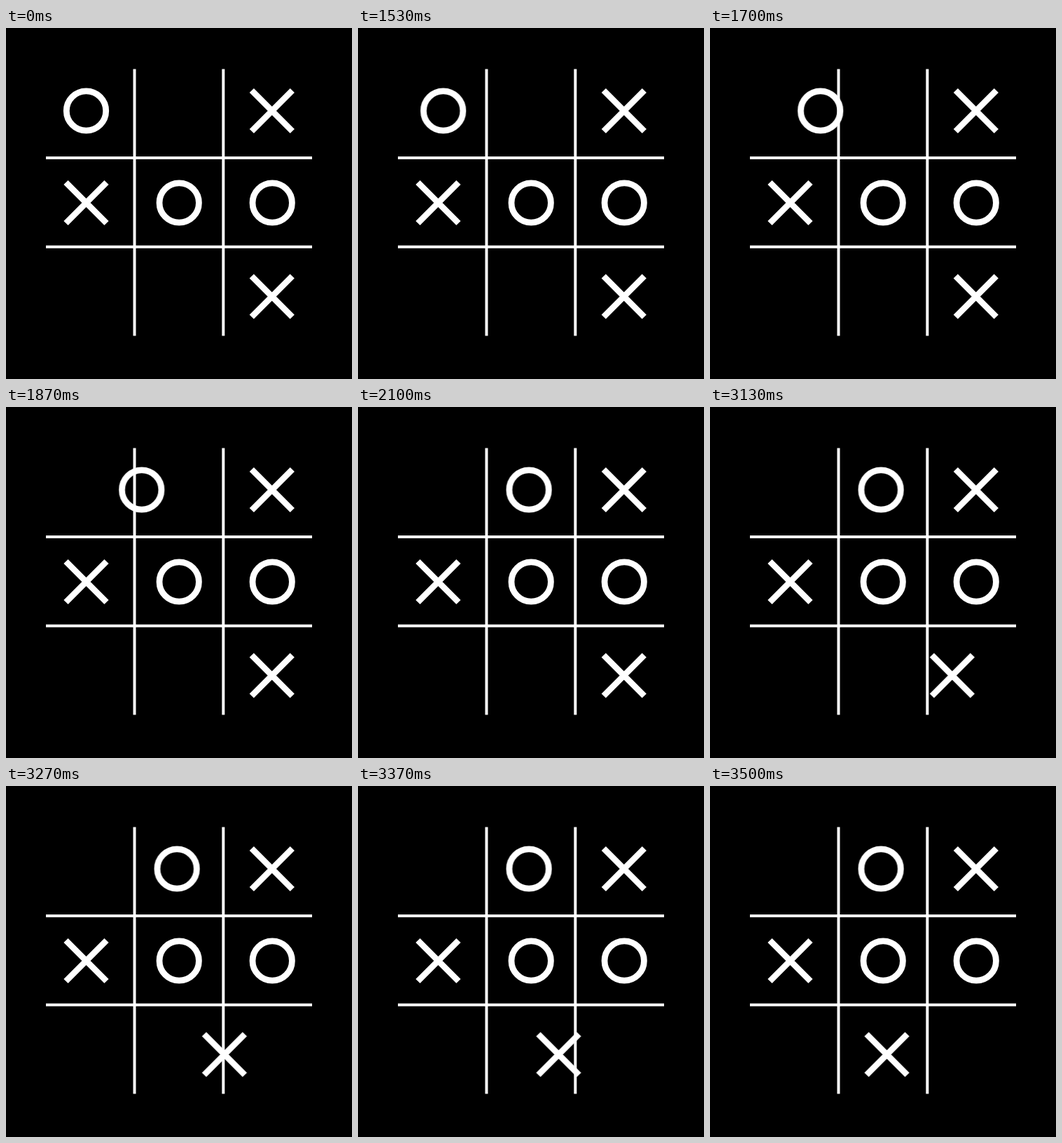
Animation of 494 by 500 pixels, one loop 4510 ms. Source, as an HTML page without scripts:

```html
<!DOCTYPE html>
<html lang="en">
<head>
<meta charset="utf-8">
<title>Noughts and crosses</title>
<style>
  html, body {
    margin: 0;
    width: 100%;
    height: 100%;
    overflow: hidden;
    background: #000;
  }
  svg { display: block; width: 100%; height: 100%; }
  .board, .mark { fill: none; stroke: #fff; }
  .board { stroke-width: 4; }
  .mark { stroke-width: 8.8; }

  .slide-o { animation: slide-o 4510ms infinite; }
  .slide-x { animation: slide-x 4510ms infinite; }

  /* Both moves advance at 30 steps per second */
  @keyframes slide-o {
    0% { transform: translateX(0); }
    33.902% { transform: translateX(0); animation-timing-function: steps(18, start); }
    47.206%, 100% { transform: translateX(129.6px); }
  }
  @keyframes slide-x {
    0% { transform: translateX(0); }
    67.162% { transform: translateX(0); animation-timing-function: steps(15, start); }
    78.248%, 100% { transform: translateX(-127.2px); }
  }
</style>
</head>
<body>
<svg viewBox="0 0 494 500">
  <defs>
    <circle id="o" r="28.2"/>
    <path id="x" d="M-29-29L29 29M29-29L-29 29"/>
  </defs>
  <path class="board" d="M183.5 58.5V438.5M310.3 58.5V438.5M57 185H437M57 311.7H437"/>
  <g class="mark">
    <use href="#x" x="379.8" y="118"/>
    <use href="#x" x="114.5" y="249"/>
    <use href="#o" x="247.2" y="249"/>
    <use href="#o" x="380.2" y="249"/>
    <g class="slide-o"><use href="#o" x="114.5" y="118"/></g>
    <g class="slide-x"><use href="#x" x="379.7" y="382.5"/></g>
  </g>
</svg>
</body>
</html>
```
